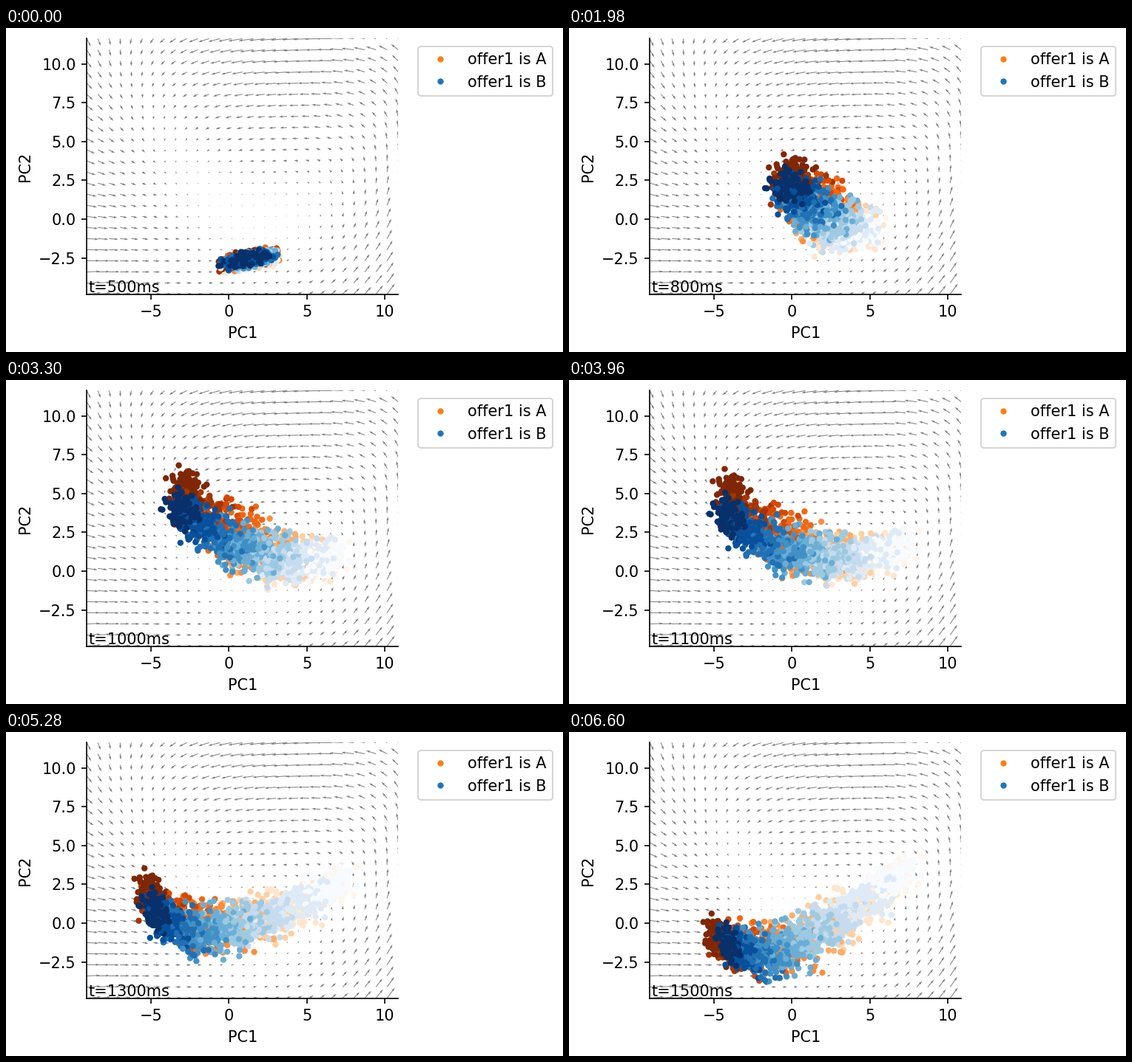
Recreate the animation shown at these times as a matplotlib script. Size 753 by 439 pixels, loop 7930 ms.

```python
import numpy as np
import matplotlib.pyplot as plt
from matplotlib.animation import FuncAnimation

W, H, DPI = 753, 439, 150
UNIT = 21.05                 # pixels per data unit
ZERO_X, ZERO_Y = 301.3, 259.05
LEFT, RIGHT, TOP, BOTTOM = 109.2, 530.2, 14.5, 360.6
INTERVAL, HOLD, LAST = 65, 330, 20
FRAMES = 122
LEVELS, PER_LEVEL = 9, 100
rng = np.random.default_rng(4)

# Path of the weakest, middle and strongest offers (x + iy) at key steps
KEY_STEPS = [0, 4, 10, 14, 20]
PATHS = np.array([
    [1.5 - 2.7j, 1.3 - 2.6j, 1.0 - 2.6j],
    [3.1 - 1.8j, 1.8 - 0.9j, 1.0 + 0.3j],
    [5.9 + 0.6j, 1.3 + 1.4j, -3.1 + 3.9j],
    [6.4 + 1.8j, -0.2 + 0.5j, -4.7 + 2.4j],
    [6.4 + 2.8j, -0.3 - 1.5j, -4.1 - 1.3j],
])
TIME_FIT = np.linalg.solve(np.vander(KEY_STEPS), PATHS)


def centre(step, s):
    """Cloud centre at a step for strength s in 0..1."""
    low, mid, high = np.vander([step], len(KEY_STEPS))[0] @ TIME_FIT
    return (low * (1 - s) * (1 - 2 * s) + mid * 4 * s * (1 - s)
            + high * s * (2 * s - 1))


def lead(step):
    """How far the strongest A offers run ahead of B."""
    return (.8 * step / LAST * np.sin(np.pi * step / 14)
            + 1.3j * np.sin(np.pi * step / 24)**2)


def flow(x, y):
    """Arrow lengths in pixels: a slow counterclockwise swirl."""
    swirl = np.exp(-((x - 4.5) / 9.5)**2)
    u = .1 * (x - 3)**2 * np.exp(-y / 20) - swirl * (1.35 * y + .05 * y**2)
    v = 15.5 * np.exp((x - 10.8) / 4.5) - 2 - y * (.25 + .004 * (x - 2)**2)
    return u, v


class Cloud:
    def __init__(self, ax, cmap, leads, spread):
        s = np.repeat(np.linspace(0, 1, LEVELS), PER_LEVEL)
        self.s = s[np.argsort(s + rng.normal(0, .12, s.size))]
        self.noise = spread * rng.uniform(-1, 1, (2, s.size, 3)).sum(-1)
        self.leads = leads
        self.dots = ax.scatter(0 * s, 0 * s, s=16, linewidths=0,
                               c=plt.get_cmap(cmap)(self.s))

    def move(self, step):
        s, age = self.s, step / LAST
        mid = 4 * s * (1 - s)
        grow = 1 - np.exp(-step / 4)
        sx = .68 + grow * (.3 * mid + .12 * (1 - s) - .35 * s * age)
        sy = .21 + grow * (.3 + .2 * mid + .1 * s * np.sin(np.pi * age))
        tilt = .2 + age * (.25 - 1.15 * s)
        pos = centre(step, s) + self.leads * s**2 * lead(step)
        dx = sx * self.noise[0]
        dy = sy * self.noise[1] + tilt * dx
        self.dots.set_offsets(np.column_stack([pos.real + dx, pos.imag + dy]))


fig = plt.figure(figsize=((W + .01) / DPI, (H + .01) / DPI), dpi=DPI,
                 facecolor="white")
ax = fig.add_axes([LEFT / W, 1 - BOTTOM / H,
                   (RIGHT - LEFT) / W, (BOTTOM - TOP) / H])
x0, x1 = (LEFT - ZERO_X) / UNIT, (RIGHT - ZERO_X) / UNIT
y0, y1 = (ZERO_Y - BOTTOM) / UNIT, (ZERO_Y - TOP) / UNIT

gx, gy = np.meshgrid(np.linspace(x0, x1, 29), np.linspace(y0, y1, 24))
ax.quiver(gx, gy, *flow(gx, gy), color="gray", scale_units="dots", scale=1)

clouds = [Cloud(ax, "Oranges", 1, 1.1), Cloud(ax, "Blues", 0, 1)]

ax.plot([], [], ".", color="tab:orange", label="offer1 is A")
ax.plot([], [], ".", color="tab:blue", label="offer1 is B")
ax.legend(loc="upper left", bbox_to_anchor=(1.04, 1))
ax.set(xlim=(x0, x1), ylim=(y0, y1), xlabel="PC1", ylabel="PC2",
       xticks=np.arange(-5, 11, 5), yticks=np.arange(-2.5, 10.1, 2.5))
ax.spines[["top", "right"]].set_visible(False)
clock = ax.text(-9, -4.7, "")


def draw(frame):
    step = min(LAST, (INTERVAL * (frame + 1) - 1) // HOLD)
    for cloud in clouds:
        cloud.move(step)
    clock.set_text(f"t={500 + 50 * step}ms")
    return [c.dots for c in clouds] + [clock]


anim = FuncAnimation(fig, draw, frames=FRAMES, interval=INTERVAL, repeat=True)
plt.show()
```
